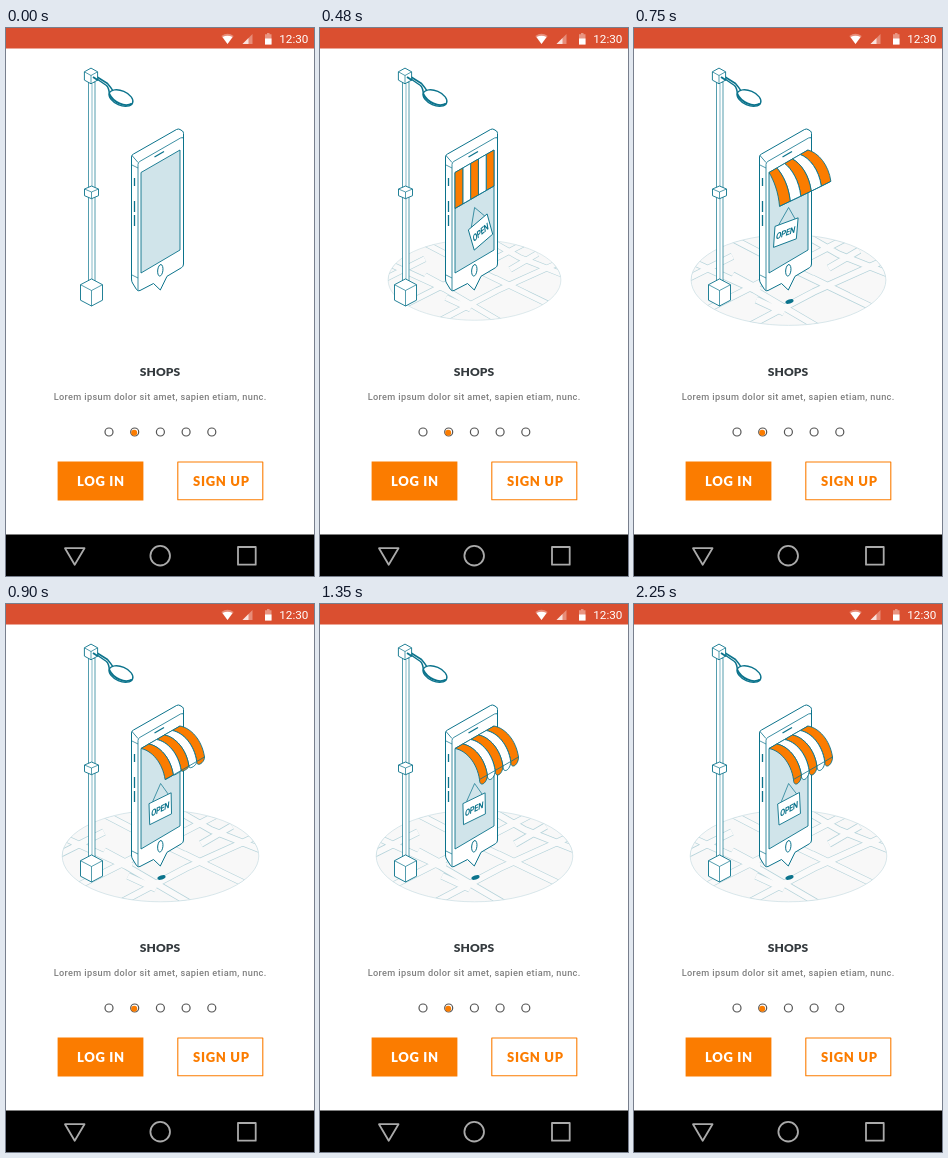
Write an HTML page with a canvas that moves like this. It is 308 by 548 pixels and loops after 2.43 s.

```html
<!DOCTYPE html>
<html lang="en">
<head>
<meta charset="utf-8">
<title>Shops</title>
<style>
html, body { margin: 0; width: 100%; height: 100%; overflow: hidden; background: #fff; }
canvas { display: block; width: 308px; height: 548px; }
</style>
</head>
<body>
<canvas id="stage"></canvas>
<script>
const W = 308, H = 548, LOOP = 2430, LAST = 2250, STEP = 30;
const TEAL = '#0b738c', PALE = '#b5d3da', SCREEN = '#d0e4ea', ORANGE = '#fb7c00';
const canvas = document.getElementById('stage');
const ctx = canvas.getContext('2d');
const ratio = window.devicePixelRatio || 1;
canvas.width = W * ratio;
canvas.height = H * ratio;

const clamp = x => Math.max(0, Math.min(1, x));
const progress = (t, from, to) => clamp((t - from) / (to - from));
const easeOut = p => 1 - (1 - p) ** 3;
const easeInOut = p => p * p * (3 - 2 * p);
const mix = (a, b, p) => a + (b - a) * p;

function paint(shape, fill, stroke, width = 1) {
  const path = typeof shape === 'string' ? new Path2D(shape) : shape;
  if (fill) { ctx.fillStyle = fill; ctx.fill(path); }
  if (stroke) { ctx.strokeStyle = stroke; ctx.lineWidth = width; ctx.stroke(path); }
}

function ellipse(x, y, rx, ry, angle = 0) {
  const path = new Path2D();
  path.ellipse(x, y, rx, ry, angle, 0, Math.PI * 2);
  return path;
}

function label(text, x, y, font, color, spacing = 0) {
  ctx.font = font;
  ctx.letterSpacing = spacing + 'px';
  ctx.textAlign = 'center';
  ctx.fillStyle = color;
  ctx.fillText(text, x + spacing / 2, y);
  ctx.letterSpacing = '0px';
}

// Isometric box around the point where its three visible faces meet.
function cube(x, y, w, slope, h) {
  paint(`M${x} ${y - 2 * slope}L${x + w} ${y - slope}V${y + h - slope}L${x} ${y + h}L${x - w} ${y + h - slope}V${y - slope}Z`, '#fff', TEAL, .9);
  paint(`M${x - w} ${y - slope}L${x} ${y}L${x + w} ${y - slope}M${x} ${y}V${y + h}`, null, TEAL, .7);
}

function statusBar() {
  paint('M0 0H308V20.5H0Z', '#da4f30');
  paint('M215.3 8Q221.5 3.5 227.7 8L221.5 16Z', 'rgba(255,255,255,.35)');
  paint('M216.5 9Q221.5 6.3 226.5 9L221.5 16Z', '#fff');
  paint('M246.5 6V16H236.5Z', 'rgba(255,255,255,.35)');
  paint('M242.5 10V16H236.5Z', 'rgba(255,255,255,.75)');
  paint('M261 5H263.5V6.3H265.5V16.5H259V6.3H261Z', 'rgba(255,255,255,.4)');
  paint('M259 10.5H265.5V16.5H259Z', '#fff');
  label('12:30', 287.8, 15, '11.7px Roboto, sans-serif', '#fff');
}

function controls() {
  label('SHOPS', 154, 348, '900 12px Lato, sans-serif', '#343a3e', .1);
  label('Lorem ipsum dolor sit amet, sapien etiam, nunc.', 154, 372, '500 9.2px Roboto, sans-serif', '#808080', .33);
  for (let i = 0; i < 5; i++) paint(ellipse(103 + i * 25.7, 404, 4, 4), null, '#555', 1.2);
  paint(ellipse(128.2, 404.7, 3, 3), ORANGE);
  paint('M51.6 433.6H137.4V472.4H51.6Z', ORANGE);
  paint('M171.8 434H256.8V471.8H171.8Z', '#fff', ORANGE, 1.1);
  const font = '900 13px Lato, sans-serif';
  label('LOG IN', 94.5, 458, font, '#fff', .7);
  label('SIGN UP', 215, 458, font, ORANGE, .7);
}

function navigationBar() {
  paint('M0 506.5H308V548H0Z', '#000');
  paint('M59 520.2H78.5L68.7 536.8Z', null, '#aaa', 1.8);
  paint(ellipse(154.2, 527.7, 9.8, 9.8), null, '#aaa', 1.8);
  paint('M232 519H249.7V536.7H232Z', null, '#aaa', 1.8);
}

function ground(t) {
  const size = easeOut(progress(t, 0, 950));
  if (!size) return;
  const disc = ellipse(0, 0, 98.3, 45.8);
  const roads = new Path2D('M50 230L120 262L185 300M92 207L140 232L250 285M165 203L205 226L258 247M60 288L135 250L218 207M108 302L180 264L260 228M98 247L126 262M178 250L215 268M54 250L98 228M195 240L226 222M150 285L122 272');
  ctx.save();
  ctx.translate(154.5, 252);
  ctx.scale(size, size);
  paint(disc, '#f8f8f8');
  ctx.save();
  ctx.clip(disc);
  ctx.translate(-154.5, -252);
  paint(roads, null, PALE, 7.4);
  paint(roads, null, '#fafafa', 6);
  ctx.restore();
  paint(disc, null, '#c9dde2', .7);
  ctx.restore();
}

function lamp() {
  paint('M82.5 54H89V255H82.5Z', '#fff', TEAL, .7);
  paint('M86 56V255', null, TEAL, .5);
  cube(85.5, 262.5, 11, 5.8, 15.5);
  cube(85.5, 164, 7, 3, 6.7);
  paint(ellipse(115, 70, 12.6, 7.2, .4), '#fff', TEAL, 1.3);
  paint('M103.3 66C107 74 119 80 126 75.5', null, TEAL, 1.9);
  paint('M88 49L100.5 57.5Q103 60 103.4 66M88 47L101.5 55.5Q104.5 59 107 62.8', null, TEAL, 1.5);
  cube(85, 47.5, 6.6, 3.7, 8.3);
  paint('M87 49L92 52.3', null, TEAL, 1.9);
}

function phone() {
  paint('M125.5 129Q125.5 127 127.5 126L170.5 101.5Q172.5 100.5 174 101.5L176.5 103Q177.5 104 177.5 105.5V236Q177.5 238.5 175.5 239.7L161 248.3L154.3 262L147.5 255.5L134 262.5Q132 263.5 130.5 261.5L126.5 255Q125.5 253.5 125.5 251Z', '#fff', TEAL, 1);
  paint('M132 262V136.5Q132 134.5 134 133.3L174.5 110Q177.5 108.5 177.5 111M126 127.5L132 134.5', null, TEAL, .8);
  paint('M126 137L132 140M126 247L132 250', null, TEAL, .7);
  paint('M128.5 150V158M128.5 173V184M128.5 187V198', null, TEAL, 1.3);
  paint('M135 144.5L174 122V222L135 245Z', SCREEN, TEAL, .9);
  paint('M148.5 129L158 123.5', null, TEAL, 1.3);
  paint(ellipse(154.3, 242.3, 2.6, 5.8, .12), '#fff', TEAL);
}

function pin(t) {
  const size = easeOut(progress(t, 510, 720));
  if (size) paint(ellipse(155.5, 273.5, 4.2 * size, 2 * size, -.3), TEAL);
}

function sign(t) {
  const size = easeOut(progress(t, 150, 450));
  if (!size) return;
  const since = t - 450;
  const swing = -.245 * Math.exp(-Math.max(0, since) / 500) * Math.cos(since * Math.PI / 320);
  ctx.save();
  ctx.translate(154.6, 179.5);
  ctx.rotate(swing);
  ctx.scale(size, size);
  paint('M-7.5 18.5L0 0L8 10.5', null, TEAL, .7);
  paint('M-11 20.5L10.8 9L11.8 30L-9.7 41.5Z', '#fff', TEAL, .9);
  ctx.transform(.78, -.42, -.05, 1, .3, 28.7);
  label('OPEN', 0, 0, '700 9.4px Roboto, sans-serif', TEAL, -.4);
  ctx.restore();
}

// One edge between stripes: unrolls down the screen, then bows outward.
function rib(t, k) {
  const drop = easeOut(progress(t, 90, 480));
  const lag = (1 - k) * 125;
  const lift = easeInOut(progress(t, 480 + lag, 800 + lag));
  const x = 135 + 39 * k, y = 144.5 - 22.5 * k;
  const at = (dx, dy, flat) => [x + dx * lift, y + mix(flat, dy, lift) * drop];
  return { drop, points: [at(0, 0, 0), at(11, 2, 12), at(22, 14, 24), at(24.5, 31, 36)] };
}

function awning(t) {
  for (let i = 4; i >= 0; i--) {
    const a = rib(t, i / 5), b = rib(t, (i + 1) / 5);
    if (!a.drop) return;
    const [a0, a1, a2, a3] = a.points, [b0, b1, b2, b3] = b.points;
    const lag = (4 - i) * 35;
    const bulge = 8.5 * easeInOut(progress(t, 740 + lag, 990 + lag));
    const stripe = new Path2D();
    stripe.moveTo(...a0);
    stripe.bezierCurveTo(...a1, ...a2, ...a3);
    stripe.bezierCurveTo(a3[0], a3[1] + bulge, b3[0], b3[1] + bulge, ...b3);
    stripe.bezierCurveTo(...b2, ...b1, ...b0);
    stripe.closePath();
    paint(stripe, i % 2 ? '#fff' : ORANGE, TEAL, .9);
    paint(`M${a3}L${b3}`, null, TEAL, .8);
  }
}

function draw(now) {
  const t = Math.min(LAST, Math.floor((now % LOOP) / STEP) * STEP);
  ctx.setTransform(ratio, 0, 0, ratio, 0, 0);
  ctx.lineJoin = 'round';
  ctx.fillStyle = '#fff';
  ctx.fillRect(0, 0, W, H);
  ground(t);
  lamp();
  phone();
  pin(t);
  sign(t);
  awning(t);
  statusBar();
  controls();
  navigationBar();
}

let start;
function frame(now) {
  start ??= now;
  draw(now - start);
  requestAnimationFrame(frame);
}
draw(0);
requestAnimationFrame(frame);
</script>
</body>
</html>
```
